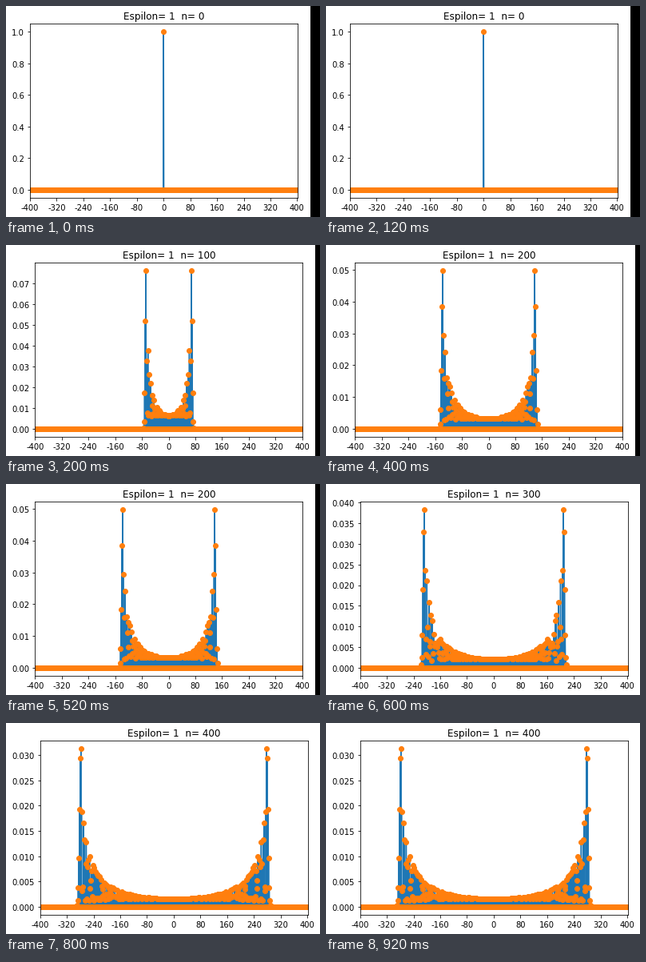
A matplotlib script for the animation above (1 s loop, 393x264 px).

```python
import matplotlib.pyplot as plt
import numpy as np
from matplotlib.animation import FuncAnimation
from matplotlib.patches import Rectangle
from matplotlib.transforms import ScaledTranslation

W, H, DPI = 393, 264, 72
AX_W, AX_H, AX_BOTTOM = 334.8, 217.44, 24.2
TEXT_DROP = 0.84            # all text sits slightly low, in pixels
REACH = 400                 # furthest position on either side
SITES = 2 * REACH + 1
STEPS_PER_FRAME = 100

plt.rcParams["font.family"] = "DejaVu Sans"
fig = plt.figure(figsize=(W / DPI, H / DPI), dpi=DPI, facecolor="white")
ax = fig.add_axes([0.1, 0.1, 0.8, 0.8])
side_bar = fig.add_artist(Rectangle((1, 0), 1, 1, transform=fig.transFigure,
                                    facecolor="black", linewidth=0))
text_shift = ScaledTranslation(0, -TEXT_DROP / DPI, fig.dpi_scale_trans)


def walk(steps):
    """Position probabilities of a Hadamard walk with a balanced coin."""
    left = np.zeros(SITES, complex)
    right = np.zeros(SITES, complex)
    left[REACH], right[REACH] = np.sqrt(0.5), 1j * np.sqrt(0.5)
    for _ in range(steps):
        left, right = (left + right) / np.sqrt(2), (left - right) / np.sqrt(2)
        left, right = np.roll(left, -1), np.roll(right, 1)
    return abs(left) ** 2 + abs(right) ** 2


def update(frame):
    steps = frame * STEPS_PER_FRAME
    prob = walk(steps)
    sites = np.arange(SITES)

    # The plot sits further right when the y labels need more decimals.
    decimals = 1 if frame == 0 else 2 if frame < 3 else 3
    ax_left = 23.64 + 6.36 * decimals
    side_bar.set_x((round(ax_left) + 351) / W)

    ax.clear()
    ax.set_position([ax_left / W, AX_BOTTOM / H, AX_W / W, AX_H / H])
    ax.plot(sites, prob)
    ax.plot(sites, prob, "o")
    ax.set_xlim(0, SITES)
    ticks = range(0, SITES, SITES // 10)
    ax.set_xticks(ticks, [str(t - REACH) for t in ticks])
    title = ax.set_title(f"Espilon= 1  n= {steps}")

    for text in [*ax.get_xticklabels(), *ax.get_yticklabels()]:
        text.set_transform(text.get_transform() + text_shift)
    title.set_transform(ax.transAxes
                        + ScaledTranslation(0, (6 - TEXT_DROP) / DPI,
                                            fig.dpi_scale_trans))
    return []


anim = FuncAnimation(fig, update, frames=5, interval=200, repeat=True,
                     repeat_delay=0, blit=False)
plt.show()
```
